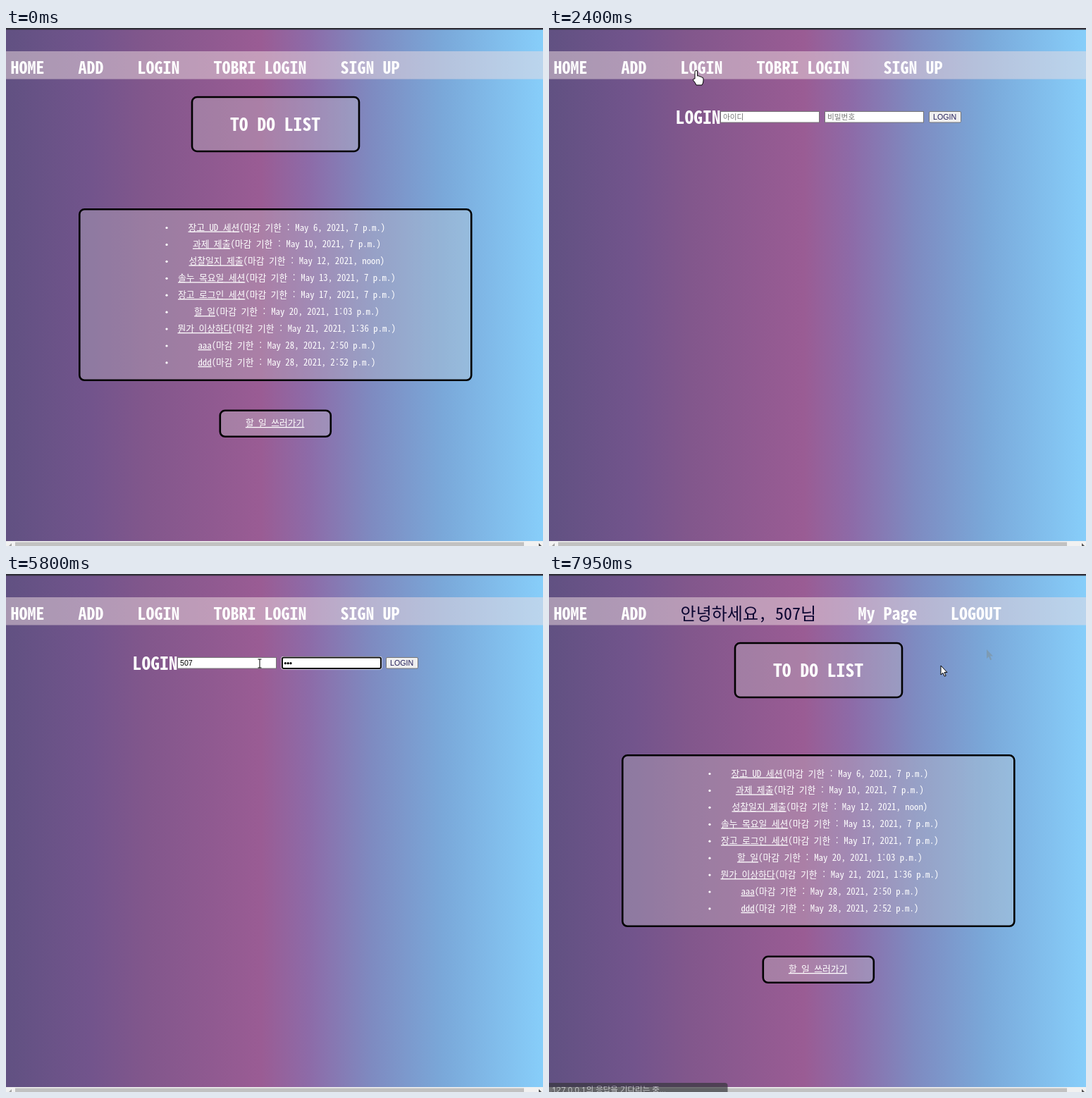
Write an HTML page that moves like this. It is 762x735 px and loops after 8000 ms.

```html
<!DOCTYPE html>
<html lang="ko">
<head>
<meta charset="utf-8">
<title>To do list</title>
<style>
  html, body { margin: 0; width: 100%; height: 100%; overflow: hidden; }
  svg { display: block; width: 100%; height: 100%; }
  .page { font-family: "Noto Sans Mono CJK KR", "Noto Sans Mono", monospace; fill: #fff; }
  .nav { font-size: 24px; }
  .title { font-size: 25.6px; }
  .nav, .title { font-weight: bold; }
  .greeting { font-weight: normal; fill: #0a0430; }
  .item { font-size: 12.8px; text-anchor: middle; }
  .link { text-decoration: underline; }
  .panel { fill: rgba(210, 210, 210, .3); stroke: #000; stroke-width: 2.6; }
  .control { font: 10.67px "Liberation Sans", "Noto Sans CJK KR", sans-serif; }
  .field { fill: #fff; stroke: #767676; }
  .hint { fill: #757575; }
  .menu { font: 11.5px "Open Sans", "Noto Sans CJK KR", sans-serif; fill: #333; }
  .cursor { fill: #fff; stroke: #000; stroke-linejoin: round; }
  .ghost { fill: #7f929b; opacity: .6; }
</style>
</head>
<body>
<svg id="stage" viewBox="0 0 762 735" preserveAspectRatio="none"></svg>
<script>
const LOOP = 8000, BLINK = 530, USER = "507";
const SUGGESTIONS = [USER, USER + "9", "admin", "belwot0482@example.com", " admin", "root"];
const TODOS = [
  ["장고 UD 세션", "May 6, 2021, 7 p.m."],
  ["과제 제출", "May 10, 2021, 7 p.m."],
  ["성찰일지 제출", "May 12, 2021, noon"],
  ["솔누 목요일 세션", "May 13, 2021, 7 p.m."],
  ["장고 로그인 세션", "May 17, 2021, 7 p.m."],
  ["할 일", "May 20, 2021, 1:03 p.m."],
  ["뭔가 이상하다", "May 21, 2021, 1:36 p.m."],
  ["aaa", "May 28, 2021, 2:50 p.m."],
  ["ddd", "May 28, 2021, 2:52 p.m."],
];
const SKY = [[0, "#615182"], [120, "#72548c"], [200, "#82578c"], [362, "#9a5c94"],
  [430, "#8d6ba8"], [520, "#7e8bc1"], [620, "#7aa8d9"], [762, "#87cefa"]];
const POINTERS = {
  arrow: "M0 0V13L3 10.3L5.2 15.2L7.2 14.3L5 9.6H9z",
  hand: "M-2 11V1a1.8 1.8 0 0 1 3.6 0V7q3-.8 3.2 1q2.6-.6 2.8 1q2.4-.3 2.4 2v3q0 3-2 6H0q-1-3-4.5-7q0-3 2.5-2z",
  beam: "M-2.5-6H2.5M0-6V6M-2.5 6H2.5",
};
// Each sweep moves the pointer along its points in a fixed number of hard steps.
const SWEEPS = [
  { from: 510, to: 700, steps: 4, points: [[740, 718], [500, 480], [270, 289], [237, 110]] },
  { from: 1030, to: 1380, steps: 6, points: [[235, 103], [209, 61]] },
  { from: 2530, to: 2790, steps: 5, points: [[216, 72], [258, 112], [277, 125]] },
  { from: 5670, to: 6470, steps: 13,
    points: [[290, 125], [430, 129], [560, 119], [621, 108], [657, 112], [600, 128], [556, 131]] },
  { from: 6600, to: 6601, steps: 1, points: [[556, 130]] },
];

const text = (x, y, content, cls = "") => `<text x="${x}" y="${y}" class="${cls}">${content}</text>`;
const rect = (x, y, w, h, attrs) => `<rect x="${x}" y="${y}" width="${w}" height="${h}" ${attrs}/>`;
const panel = (x, y, w, h) => rect(x, y, w, h, 'rx="7" class="panel"');
const between = (t, from, to) => t >= from && t < to;
const caretOn = (t, since) => Math.floor((t - since) / BLINK) % 2 === 0;
const typedCount = (t, times) => times.filter(time => t >= time).length;

function background() {
  const stops = SKY.map(([x, color]) => `<stop offset="${x / 762}" stop-color="${color}"/>`).join("");
  return `<defs><linearGradient id="sky">${stops}</linearGradient></defs>` +
    rect(0, 0, 762, 735, 'fill="url(#sky)"') +
    rect(0, 0, 762, 2.4, 'fill="#302f39"') +
    rect(0, 33, 762, 39.5, 'fill="rgba(240,221,225,.5)"') +
    rect(0, 728, 762, 7, 'fill="#f1f1f1"') +
    rect(13, 729.5, 722, 6, 'fill="#c1c1c1"') +
    '<path d="M8 731V735H4z" fill="#a3a3a3"/><path d="M756 731V735H760z" fill="#505050"/>';
}

function navigation(loggedIn) {
  const labels = loggedIn
    ? [`안녕하세요, ${USER}님`, "My Page", "LOGOUT"]
    : ["LOGIN", "TOBRI LOGIN", "SIGN UP"];
  const starts = loggedIn ? [186.6, 438.4, 570] : [186.6, 294.6, 474.4];
  return text(6.6, 65, "HOME", "nav") + text(102.6, 65, "ADD", "nav") +
    labels.map((label, i) =>
      text(starts[i], 65, label, loggedIn && i === 0 ? "nav greeting" : "nav")).join("");
}

function todoPage() {
  const rows = TODOS.map(([name, due], i) => {
    const y = 287.5 + i * 23.93;
    return `<circle cx="228" cy="${y - 4}" r="1.6"/>` +
      text(398.4, y, `<tspan class="link">${name}</tspan>(마감 기한 : ${due})`, "item");
  });
  return panel(264, 98, 237, 77) + text(318, 146, "TO DO LIST", "title") +
    panel(104.3, 257.3, 556, 242.5) + rows.join("") +
    panel(303.8, 542.8, 157, 37) + text(381.6, 565, "할 일 쓰러가기", "item link");
}

function field(x, hint, value, focused, caretX) {
  const frame = focused
    ? rect(x - .5, 117, 143, 18.5, 'rx="3" fill="#fff"') +
      rect(x + 1, 118.5, 140, 15.5, 'rx="2" fill="#fff" stroke="#101010" stroke-width="2"')
    : rect(x + .5, 118.5, 140, 15.5, 'class="field"');
  const caret = caretX ? rect(caretX, 120, 1, 12, 'fill="#000"') : "";
  return frame + text(x + 4, 130, value || hint, value ? "control" : "control hint") + caret;
}

function suggestionMenu(items) {
  const height = items.length * 28.65 + 13.5;
  return rect(243, 136.5, 164, height, 'rx="4" fill="#000" opacity=".22"') +
    rect(243.3, 135.7, 162.7, height - 1, 'rx="3" fill="#fff"') +
    items.map((item, i) =>
      text(item[0] === " " ? 257 : 253, 161 + i * 28.65, item.trim(), "menu")).join("");
}

function loginPage(t) {
  const nameKeys = [3670, 3800, 3940], passKeys = [4860, 4990, 5120];
  const nameLength = typedCount(t, nameKeys), passLength = typedCount(t, passKeys);
  const nameFocus = between(t, 3050, 4670), passFocus = between(t, 4670, 6740);
  const nameSince = nameLength ? nameKeys[nameLength - 1] : 3050;
  const passSince = passLength ? passKeys[passLength - 1] : 4670;
  const nameCaret = nameFocus && caretOn(t, nameSince) && 246.5 + nameLength * 5.93;
  const passCaret = passFocus && caretOn(t, passSince) && 394 + passLength * 3.74;
  const dots = Array.from({ length: passLength }, (_, i) =>
    `<circle cx="${396.4 + i * 3.8}" cy="126.7" r="1.6" fill="#000"/>`).join("");
  const face = between(t, 6740, 6940) ? "#f5f5f5" : t >= 6470 ? "#e5e5e5" : "#efefef";
  return text(179.6, 135.5, "LOGIN", "title") +
    `<g fill="#000">` +
    field(243, "아이디", USER.slice(0, nameLength), nameFocus, nameCaret) +
    field(391, "비밀번호", passLength ? " " : "", passFocus, passCaret) + dots +
    rect(539.5, 118.5, 45, 15.5, `rx="1.5" fill="${face}" stroke="#767676"`) +
    `<g fill="#25205c">${text(545, 130, "LOGIN", "control")}</g></g>` +
    (between(t, 3130, 4670) ? suggestionMenu(nameLength ? SUGGESTIONS.slice(0, 2) : SUGGESTIONS) : "");
}

function statusBar(width, content, size, opacity) {
  return `<g opacity="${opacity}">` +
    rect(-5, 722, width + 5, 20, 'rx="4" fill="#35363a"') +
    `<text x="4" y="736" class="menu" style="font-size:${size}px;fill:#c4c6ca">${content}</text></g>`;
}

function status(t) {
  if (between(t, 1530, 2400)) {
    const opacity = t < 1600 ? .5 : t < 2260 ? 1 : t < 2330 ? .65 : .3;
    return statusBar(172.5, "127.0.0.1:8000/registration/login", 10.8, opacity);
  }
  return t >= 7230 ? statusBar(253.5, "127.0.0.1의 응답을 기다리는 중...", 11.5, t < 7950 ? 1 : .68) : "";
}

function pointerAt(t) {
  const sweep = SWEEPS.filter(s => t >= s.from).pop();
  if (!sweep) return null;
  const { from, to, steps, points } = sweep;
  const last = Math.max(steps - 1, 1);
  const step = Math.min(steps - 1, Math.floor((t - from) / (to - from) * last + 1e-6));
  const along = step / last * (points.length - 1);
  const i = Math.min(Math.floor(along), points.length - 1);
  const [a, b] = [points[i], points[i + 1] || points[i]];
  return a.map((v, axis) => Math.round(v + (b[axis] - v) * (along - i)));
}

function pointerShape(t, x, y) {
  const onNav = between(y, 48, 68) && between(x, 187, 247);
  const onTodo = t < 2070 && between(x, 255, 340) && between(y, 275, 295);
  if (onNav || onTodo) return "hand";
  const inField = between(x, 243, 385) || between(x, 391, 532);
  return between(t, 2070, 7690) && inField && between(y, 118, 135) ? "beam" : "arrow";
}

const mark = (shape, x, y, cls) =>
  `<path d="${POINTERS[shape]}" transform="translate(${x} ${y})" class="${cls}"/>`;

function pointer(t) {
  const position = pointerAt(t);
  if (!position) return "";
  const [x, y] = position;
  const clicking = between(t, 1530, 1800) || between(t, 3050, 3270) || between(t, 6740, 6940);
  const [cx, cy] = between(t, 3050, 3270) ? [275.5, 124] : [x, y];
  return (between(t, 640, 2070) ? mark("hand", 269, 288, "ghost") : "") +
    (t >= 5940 ? mark("arrow", 621, 107, "ghost") : "") +
    (clicking ? `<circle cx="${cx}" cy="${cy}" r="9.7" fill="#ead92e" opacity=".72"/>` : "") +
    mark(pointerShape(t, x, y), x, y, "cursor");
}

const stage = document.getElementById("stage");
stage.innerHTML = background() + '<g id="scene"></g>';
const scene = document.getElementById("scene");
const todo = todoPage();
let previous = "";

function draw(now) {
  const t = now % LOOP;
  const page = between(t, 2070, 7690) ? loginPage(t) : todo;
  const markup = `<g class="page">${navigation(t >= 7690)}${page}</g>` + status(t) + pointer(t);
  if (markup !== previous) scene.innerHTML = previous = markup;
  requestAnimationFrame(draw);
}
draw(0);
</script>
</body>
</html>
```
